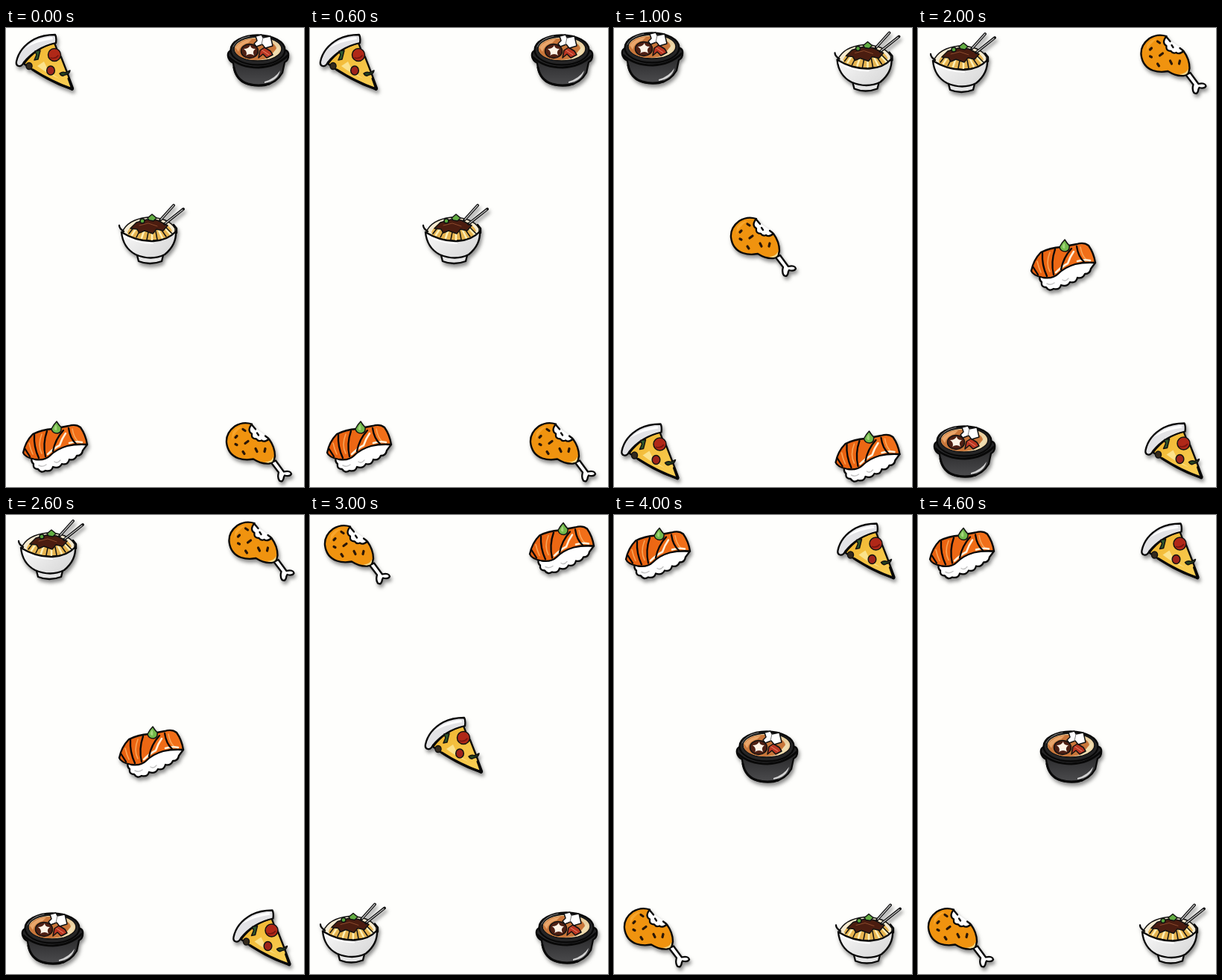
These frames come from a looping animation (400 px wide and 616 px high, 5000 ms). An HTML page:

```html
<!DOCTYPE html>
<html lang="en">
<head>
<meta charset="utf-8">
<title>Food shuffle</title>
<style>
html, body { margin: 0; width: 100%; height: 100%; overflow: hidden; background: #fefefc; }
svg { display: block; width: 100vw; height: 100vh; }
.food { filter: drop-shadow(2px 4px 2.5px rgba(50, 50, 50, .55)); }
path, ellipse, circle { stroke-linecap: round; stroke-linejoin: round; }
.ink { stroke: #080808; stroke-width: 2.3; }
.thin { stroke: #121212; stroke-width: 1.5; }
.line { fill: none; }
</style>
</head>
<body>
<svg viewBox="0 0 400 616" preserveAspectRatio="none">
  <defs>
    <linearGradient id="cheese" x1="0" y1="0" x2="1" y2="1">
      <stop offset="0" stop-color="#efb32c"/><stop offset="1" stop-color="#fad158"/>
    </linearGradient>
    <linearGradient id="china" x1="0" y1="0" x2="1" y2="0.6">
      <stop offset="0" stop-color="#fafafa"/><stop offset=".5" stop-color="#e9e9e9"/><stop offset="1" stop-color="#dadada"/>
    </linearGradient>
    <linearGradient id="iron" x1="0" y1="0" x2="0" y2="1">
      <stop offset="0" stop-color="#1f1f20"/><stop offset=".65" stop-color="#3c3c3e"/><stop offset="1" stop-color="#4c4c4e"/>
    </linearGradient>
    <linearGradient id="salmon" x1="0" y1="0" x2="1" y2="0">
      <stop offset="0" stop-color="#e8600f"/><stop offset="1" stop-color="#f2711a"/>
    </linearGradient>
  </defs>

  <g id="pizza" class="food">
    <path class="ink" fill="url(#cheese)" d="M11 40 Q28 18 52 12 Q55 22 61 31 Q69 51 77 73 Q77 76 74 74 Q42 63 11 40Z"/>
    <path fill="#fbe28c" d="M29 43 L38 37 Q44 53 59 60 Q43 54 29 43Z"/>
    <path class="ink" fill="#e3e3e6" d="M53 1 Q37 1 25 7 Q5 18 1 37 Q0 42 4 43 Q8 44 11 38 Q27 18 54 12 Q55 4 53 1Z"/>
    <path fill="#fff" d="M49 4 Q26 6 13 19 Q28 10 50 7Z"/>
    <circle class="thin" fill="#b02818" cx="52" cy="28" r="8.5"/>
    <path class="line" stroke="#741510" stroke-width="1.5" d="M47 32 Q53 34 57 29"/>
    <ellipse class="thin" fill="#9e241b" cx="47" cy="49" rx="5.3" ry="6"/>
    <path class="thin" fill="#315a2c" d="M26 23 L33 22 L30 34 L25 35 L28 28Z"/>
    <ellipse class="thin" fill="#342a1d" cx="18" cy="43" rx="4" ry="4.5"/>
    <path class="thin" fill="#26451f" d="M59 53 Q63 50 67 52 L73 49 Q72 54 66 55 Q62 58 59 53Z"/>
    <path class="line" stroke="#080808" stroke-width="3" d="M23 48 Q48 64 76 74 L71 60"/>
  </g>

  <g id="pot" class="food">
    <path class="ink" fill="url(#iron)" d="M5 22 Q0 24 1 30 Q2 36 8 39 Q9 56 20 64 Q32 71 50 69 Q66 66 74 52 L77 38 Q83 35 82 26 Q81 22 77 22Z"/>
    <ellipse class="ink" fill="#252526" cx="41" cy="21.5" rx="36.5" ry="20"/>
    <path class="line" stroke="#777" stroke-width="1.2" d="M8 17 Q14 6 30 3"/>
    <ellipse class="thin" fill="#ead0a0" cx="41" cy="20" rx="32" ry="16"/>
    <ellipse fill="#c9763a" cx="38" cy="20.5" rx="28" ry="14.5"/>
    <path fill="#e9a66b" d="M11 18 Q18 8 33 7 L28 12 Q18 14 15 24Z"/>
    <path fill="#f0ddb0" d="M60 27 L69 16 Q73 23 64 30 L55 34Z"/>
    <ellipse class="thin" fill="#4e2014" cx="30" cy="23" rx="11.5" ry="9.5"/>
    <path fill="#fff4e7" d="M31 15 Q31 20 38 20 Q33 23 36 29 Q31 25 25 29 Q28 24 22 20 Q29 20 31 15Z"/>
    <path class="thin" fill="#bd3723" d="M44 22 L50 18 L58 23 L61 28 L53 32 L48 27 L42 32Z"/>
    <path stroke="#e88b70" fill="none" d="M47 22 L56 28"/>
    <path class="thin" fill="#fff" d="M38 3 L46 1 L48 5 L58 3 L61 16 L51 19 L47 14 L39 17 L36 13 L40 9Z"/>
    <path class="line" stroke="#777" d="M48 5 L46 14"/>
    <path fill="#d2d2d2" d="M50 64 Q64 60 71 49 Q68 63 50 66Z"/>
    <path class="line" stroke="#080808" stroke-width="3" d="M2 31 Q17 45 42 45 Q66 44 81 29"/>
    <path class="line" stroke="#080808" stroke-width="3" d="M9 45 Q12 62 28 67 Q42 71 56 67"/>
  </g>

  <g id="bowl" class="food">
    <path class="ink" fill="#e4e4e4" d="M25 69 L27 77 Q42 83 58 77 L60 69Z"/>
    <path class="thin" fill="#f5ead0" d="M5 38 Q12 21 39 18 Q67 18 76 33 L76 40 Q48 58 5 40Z"/>
    <path fill="#e6b450" d="M12 38 Q18 24 40 21 Q65 22 72 36 L66 46 Q37 52 13 43Z"/>
    <path class="line" stroke="#fff0b7" stroke-width="2.5" d="M18 42 L23 34 M31 46 L34 37 M45 48 L45 38 M59 46 L54 36 M69 40 L61 31"/>
    <path class="thin line" d="M14 40 L21 31 M24 45 L29 35 M38 48 L40 38 M52 48 L50 37 M64 44 L57 34 M72 40 L63 31"/>
    <path class="thin" fill="#4b1d10" d="M16 33 L24 25 L38 21 L52 22 L66 29 L60 36 L51 34 L46 40 L35 36 L28 39 L25 34Z"/>
    <path stroke="#8c4b2d" fill="none" d="M28 29 L40 26 L52 30"/>
    <path class="thin" fill="#63ad43" d="M39 19 L45 14 L51 19 L47 23 L41 22Z"/>
    <circle class="thin" fill="#58a83d" cx="32" cy="23" r="3"/>
    <path class="ink" fill="url(#china)" d="M4 38 Q25 51 47 50 Q66 49 77 37 Q78 55 62 68 Q44 77 23 68 Q6 59 4 38Z"/>
    <path class="line" stroke="#fff" stroke-width="2" d="M7 43 Q25 53 46 53"/>
    <path class="ink line" d="M1 29 Q1 33 7 37 M74 28 L78 33 L78 39"/>
    <path class="line" stroke="#111" stroke-width="3.8" d="M56 22 L74 2 M62 27 L87 7"/>
    <path class="line" stroke="#c9c9c9" stroke-width="1.2" d="M57 21 L74 2 M63 26 L86 8"/>
  </g>

  <g id="chicken" class="food">
    <path class="ink" fill="#fff" d="M60 54 L70 67 Q68 74 71 78 Q76 81 77 73 L78 71 Q85 73 87 69 Q86 64 77 66 L66 51Z"/>
    <path fill="#fff" d="M31 2 L38 7 L45 12 L56 20 L55 25 L35 24 L27 10Z"/>
    <path class="ink" fill="#f0930f" d="M34 2 Q22 -2 11 5 Q-1 14 0 27 Q2 43 16 48 Q25 51 36 49 Q47 56 57 55 Q64 54 65 45 Q65 33 57 22 Q51 27 47 24 Q43 26 40 22 Q33 22 34 15 Q27 11 34 2Z"/>
    <path fill="#f7a52c" d="M8 13 Q14 5 22 5 Q10 13 7 24Z"/>
    <path fill="#f2d98e" d="M51 53 Q60 53 63 46 Q64 54 56 54Z"/>
    <path class="line" stroke="#2b1707" stroke-width="3.2" d="M22 9 l3 2 M12 20 l2 -2 M25 28 l4 -3 M39 35 l2 4 M51 39 l1 -4 M22 39 l2 3 M12 29 l2 1"/>
    <path class="ink line" d="M34 3 L39 9 M41 14 L43 17 M52 18 L56 21"/>
  </g>

  <g id="sushi" class="food">
    <path class="ink" fill="#fff" d="M12 48 Q10 54 14 57 Q13 64 20 64 Q24 70 30 66 Q38 68 40 61 Q48 64 52 57 Q60 59 62 51 Q69 53 72 46 Q79 46 80 39 L86 31 L61 30 L32 42Z"/>
    <path class="line" stroke="#c7c7c7" stroke-width="1.5" d="M21 59 Q26 62 31 58 M42 54 Q46 57 50 52"/>
    <path class="ink" fill="url(#salmon)" d="M0 42 Q3 27 13 17 Q25 11 40 10 L61 6 Q71 3 77 8 Q84 18 86 31 Q71 30 59 33 Q45 37 36 46 Q29 53 16 51 Q2 48 0 42Z"/>
    <path class="line" stroke="#f9a456" stroke-width="1.6" d="M8 29 Q10 38 13 44 M25 17 Q19 32 25 43 M66 10 Q68 22 74 27"/>
    <path class="line" stroke="#fff0d9" stroke-width="2.6" d="M33 44 Q41 36 49 32 Q52 23 57 16 M62 29 Q71 26 79 28"/>
    <path class="ink line" d="M15 18 Q14 34 21 49 M32 13 Q26 30 30 47 M54 12 Q43 24 40 40 M61 9 Q63 23 71 30 M2 36 L9 47"/>
    <path class="thin" fill="#71b94b" d="M45 0 Q48 5 51 8 Q52 15 46 16 Q39 16 38 10 Q41 4 45 0Z"/>
    <path fill="#a5d67c" d="M44 4 Q46 7 45 12 Q41 12 42 8Z"/>
  </g>
</svg>
<script>
const HOLD = 1000;
// Top-left corner of each dish at every step.
const spots = {
  pizza: [[13, 8], [9.5, 530.5], [304.5, 529.5], [154, 271], [299.5, 10.5]],
  pot: [[297, 8], [10, 5], [21, 533], [303, 532], [164, 289]],
  bowl: [[151, 236], [295.5, 4.5], [16, 6], [13, 520.5], [297, 521.5]],
  chicken: [[296, 529.5], [157, 254], [299.5, 9], [20, 13.5], [14, 527.5]],
  sushi: [[23, 528], [297.5, 541], [152, 284], [295, 10.5], [16, 17.5]]
};
const dishes = Object.entries(spots).map(([id, path]) => ({ el: document.getElementById(id), path }));

function draw() {
  const step = Math.floor(performance.now() / HOLD) % 5;
  for (const { el, path } of dishes) el.setAttribute("transform", `translate(${path[step]})`);
  requestAnimationFrame(draw);
}
draw();
</script>
</body>
</html>
```
